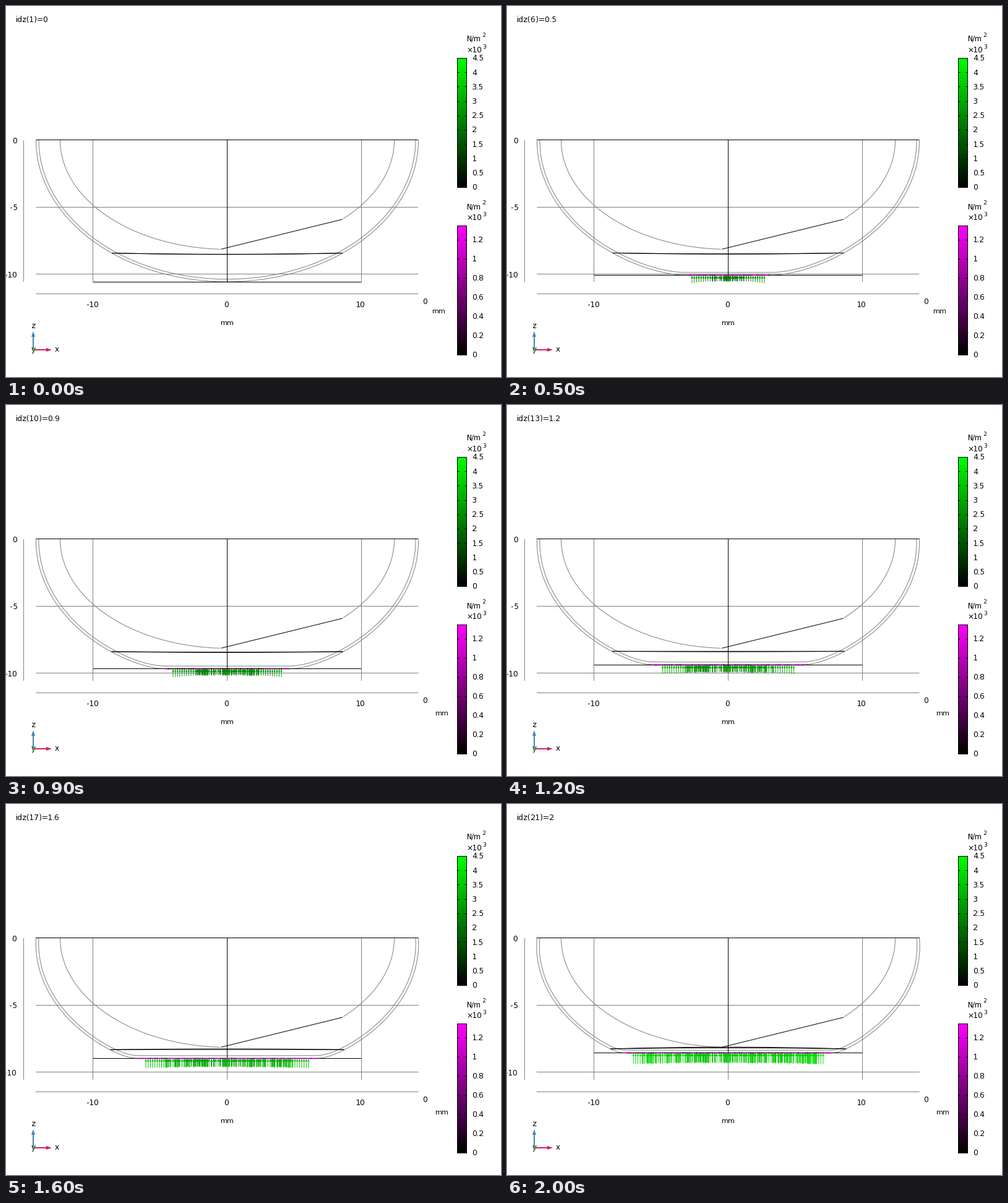
A matplotlib script for the animation above (2100 ms loop, 800x600 px).

```python
import numpy as np
import matplotlib.pyplot as plt
from matplotlib.animation import FuncAnimation
from matplotlib.collections import LineCollection, PolyCollection

W, H, DPI = 800, 600, 100
FRAMES, STEP_MS = 21, 100
PX = 72 / DPI               # points per pixel
MM = 21.7                   # pixels per millimetre
CX, TOP = 357.5, 217.0      # middle of the bowl and its rim
A, B = 309, 229             # half axes of the outer shell
GRAY = "#808080"

# Crisp pixel-aligned lines and whole-pixel glyph advances
plt.rcParams.update({"font.family": "DejaVu Sans", "path.snap": False,
                     "text.hinting_factor": 1})
fig = plt.figure(figsize=(W / DPI, H / DPI), dpi=DPI, facecolor="white")
ax = fig.add_axes([0, 0, 1, 1])
ax.set_xlim(0, W)
ax.set_ylim(H, 0)
ax.axis("off")


def line(x, y, color="black", width=1.0, z=2):
    return ax.plot(x, y, color=color, lw=width * PX, zorder=z,
                   solid_capstyle="butt")[0]


def label(x, y, s, size=12, z=6):
    return ax.text(x, y, s, fontsize=size * PX, va="baseline", zorder=z)


def pixel(v):
    return np.floor(v) + 0.5


def color_bar(top, rgb, vmax, ticks):
    bottom, left, right = top + 209, 729.5, 744.5
    ramp = np.linspace(1, 0, 209)[:, None, None] * np.array(rgb)
    ax.imshow(ramp, extent=(left, right, bottom, top), aspect="auto",
              interpolation="nearest", zorder=2)
    line([left, right, right, left, left],
         [top, top, bottom, bottom, top], z=3)
    for v in ticks:
        y = bottom - 209 * v / vmax
        line([left, left + 3], [pixel(y)] * 2, z=3)
        line([right - 3, right], [pixel(y)] * 2, z=3)
        label(753, y + 3.8, f"{v:g}")
    label(744, top - 27.5, "N/m")
    label(769, top - 34.5, "2", 9)
    label(744, top - 9.5, "×10")
    label(770, top - 15.5, "3", 9)


def triad(x=44, y=556):
    blue, red = "#4682be", "#d61e5f"
    line([x, x], [y, y - 22], blue, 2, 4)
    line([x, x + 22], [y, y], red, 2, 4)
    ax.fill([x - 3, x + 3, x], [y - 21, y - 21, y - 30], color=blue, lw=0, zorder=4)
    ax.fill([x + 21, x + 21, x + 30], [y - 3, y + 3, y], color=red, lw=0, zorder=4)
    label(x - 3, y + 3, "y", z=4)
    ax.plot([x], [y], "o", ms=5 * PX, mew=0, color="#50a03c", zorder=5)
    label(x - 3, y - 35, "z")
    label(x + 35, y + 3, "x")


# Fixed scenery
color_bar(84.5, (0, 1, 0), 4.5, np.arange(0, 4.6, 0.5))
color_bar(355.5, (1, 0, 1), 1.345, np.arange(0, 1.3, 0.2))
triad()
for gx in (140.5, 357.5, 574.5):
    line([gx, gx], [217, 446], GRAY, z=1)
for tx, s in ((130, "-10"), (352, "0"), (565, "10")):
    label(tx, 487, s)
label(346, 516, "mm", 11)

t = np.linspace(0, np.pi, 400)
cut_l, cut_r = (347.5, 393.3), (544.0, 345.0)
cav_x, cav_y = CX + 270 * np.cos(t), TOP + 176.5 * np.sin(t)
for part in (cav_x < cut_l[0], cav_x > cut_r[0]):
    line(cav_x[part], cav_y[part], GRAY)
line(*zip(cut_l, cut_r), z=3)

# Moving parts
title = label(15, 26, "")
grid = [line([], [], GRAY, z=1) for _ in range(3)]
rim = line([], [], z=3)
z_axis = line([], [], GRAY)
z_left = (10, 6, -2)
z_labels = [label(x, y, s) for x, y, s in
            zip(z_left, (222, 330, 439), ("0", "-5", "-10"))]
depth_zero = label(0, 482, "0")
depth_unit = label(0, 0, "mm", 11)
shells = [line([], [], GRAY) for _ in range(2)]
disc = [line([], [], z=3) for _ in range(2)]
plate = line([], [], z=3)
stem = line([], [], z=3)
shafts = LineCollection([], linewidths=PX, zorder=4)
heads = PolyCollection([], linewidths=0, zorder=4)
shear = LineCollection([], linewidths=2 * PX, zorder=5)
for c in (shafts, heads, shear):
    ax.add_collection(c, autolim=False)

rng = np.random.default_rng(4)
extra_x = rng.uniform(-150, 150, 190)
extra_len = rng.uniform(-1.2, 1.0, 190)
shear_mix = rng.uniform(-0.3, 0.3, 400)


def depth(x):
    return B * np.sqrt(np.clip(1 - (x / A) ** 2, 0, 1))


def contact(d):
    return 107.5 * d ** 0.636


def lift(x, d):
    """Upward shift of the shell: flat inside the contact, fading outside."""
    if d == 0:
        return np.zeros_like(x)
    c, floor = contact(d), B - MM * d
    edge = depth(c) - floor
    slope = B * B * c / (A * A * depth(c))
    r = np.abs(x)
    return np.where(r < c, depth(r) - floor,
                    edge * np.exp(-np.maximum(r - c, 0) * slope / edge))


def bulge(d):
    """Outward swelling of the free wall between rim and contact."""
    s = np.minimum(t, np.pi - t) / np.arccos(contact(d) / A)
    swell = 1.66 * d * d * np.sin(np.pi * s) * (1 - s) * (s < 1)
    nx, ny = np.cos(t) / A, np.sin(t) / B
    n = np.hypot(nx, ny)
    return swell * nx / n, swell * ny / n


def comb(half, pitch=3.65):
    n = int(half / pitch)
    return np.arange(-n, n + 1) * pitch


def draw_arrows(d, y):
    if d == 0:
        shafts.set_segments([])
        heads.set_verts([])
        shear.set_segments([])
        return
    half = 94.6 * d ** 0.694 + 1.5
    near = np.abs(extra_x) < 45 * d + 13.5 * d * d
    x = np.append(comb(half), extra_x[near])
    size = 9 + 1.7 * d * d + (4 - 0.8 * d) * np.abs(x / half) ** 3
    size[len(x) - near.sum():] += extra_len[near]
    green = [(0, g, 0) for g in np.clip(size / 20, 0, 1)]
    x = x + CX
    shafts.set_segments([[(a, y + s), (a, y + 2)] for a, s in zip(x, size)])
    shafts.set_color(green)
    heads.set_verts([[(a - 1.7, y + 5), (a + 1.7, y + 5), (a, y + 0.5)] for a in x])
    heads.set_facecolor(green)

    r = contact(d)
    sx = comb(r)
    level = 0.45 + 0.25 * np.cos(2 * np.pi * (d - 0.25) / 1.3)
    m = np.clip(level + 0.25 * (sx / r) ** 2 + shear_mix[:len(sx)], 0, 1)
    shear.set_segments([[(CX + a - 1.4, y), (CX + a + 1.4, y)] for a in sx])
    shear.set_color([(v, 0, v) for v in m])


def update(k):
    d = k / 10
    grow = 0.15 * d * d
    left, right = 48.4 - grow, 666.2 + grow
    title.set_text(f"idz({k + 1})={d:g}")

    for g, y in zip(grid, (325.5, 433.5, 465.5)):
        g.set_data([left, right], [y, y])
    rim.set_data([left, right], [216.5, 216.5])
    z_axis.set_data([pixel(28.9 - 1.5 * grow)] * 2, [217, 446])
    for lab, x in zip(z_labels, z_left):
        lab.set_x(x - 1.5 * grow)
    depth_zero.set_x(673 + grow)
    depth_unit.set_position((693 + grow, 502) if k >= 8 else (688, 497))

    bx, by = bulge(d)
    for shell, a, b in zip(shells, (A, 304.5), (B, 224.8)):
        x = a * np.cos(t)
        shell.set_data(CX + x + bx, TOP + b * np.sin(t) + by - lift(x, d))

    u = np.linspace(-1, 1, 60)
    end = 399.6 - 0.9 * d * d
    mid = 401.6 - 0.2 * d - 1.85 * d * d
    for curve, side in zip(disc, (-1, 1)):
        m = mid + side * (0.2 + 0.12 * d * d)
        curve.set_data(CX + u * (186.3 + d * d), end + (m - end) * (1 - u * u))

    y = pixel(446.3 - MM * d)
    plate.set_data([140.5, 574.5], [y, y])
    stem.set_data([CX, CX], [217, y])
    draw_arrows(d, y)


anim = FuncAnimation(fig, update, frames=FRAMES, interval=STEP_MS,
                     init_func=lambda: update(0), repeat=True, repeat_delay=0)
plt.show()
```
